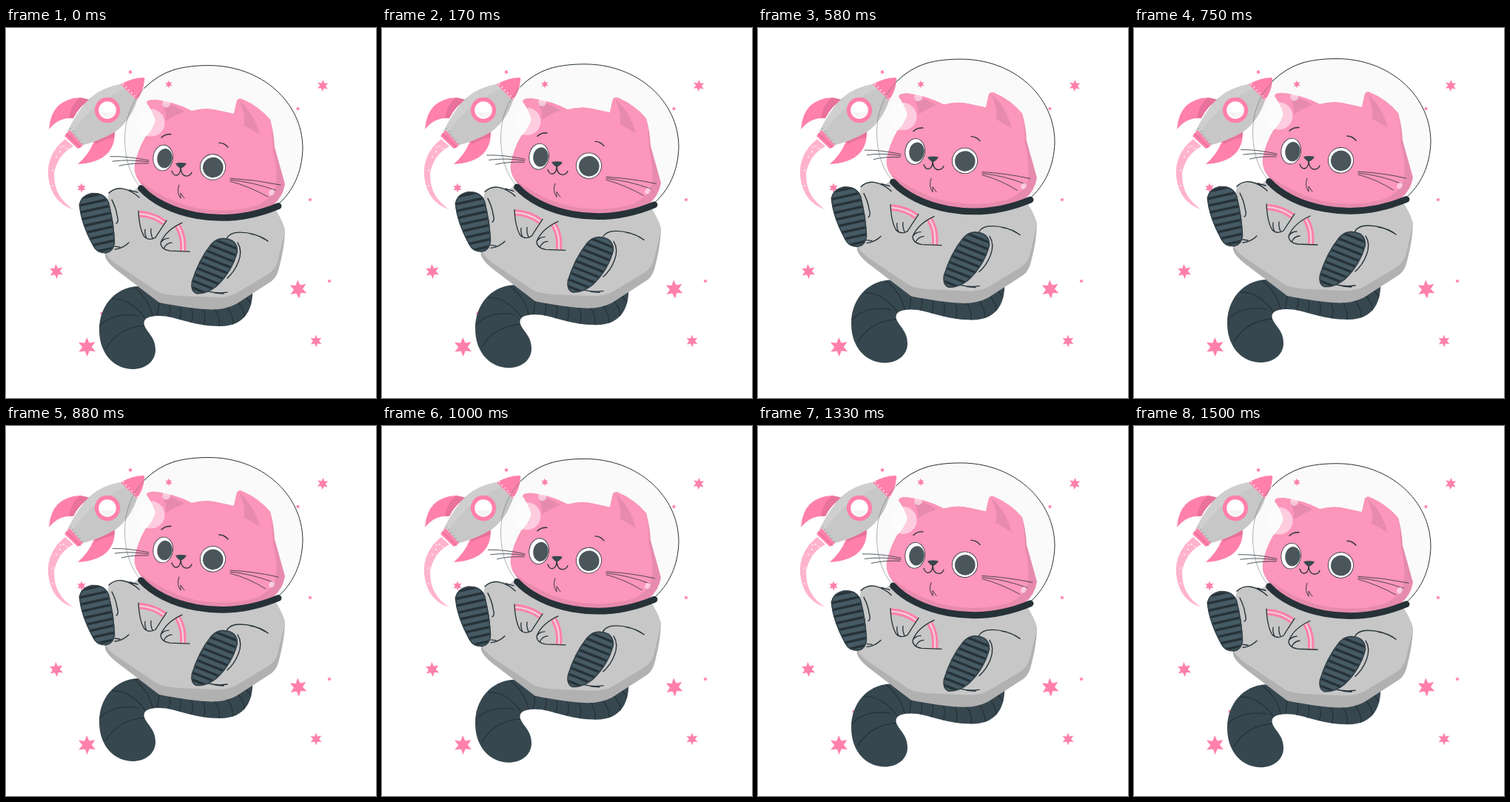
Animation of 500x500 px, one loop 1.54 s. Source, as an HTML page with a canvas:

```html
<!DOCTYPE html>
<html lang="en">
<head>
<meta charset="utf-8">
<title>Floating space cat</title>
<style>
html, body { margin: 0; width: 100%; height: 100%; overflow: hidden; background: #fff; }
canvas { display: block; width: 500px; height: 500px; }
</style>
</head>
<body>
<canvas id="stage"></canvas>
<script>
const LOOP = 1540;
const PINK = '#ff80ab', FUR = '#fc96ba', FUR_SHADE = '#e78bae';
const SUIT = '#c7c7c7', SUIT_SHADE = '#b1b1b1', INK = '#263238', SLATE = '#37474f', SOLE = '#455a64';

const canvas = document.getElementById('stage');
const ctx = canvas.getContext('2d');
const scale = window.devicePixelRatio || 1;
canvas.width = canvas.height = 500 * scale;

function fill(d, color) {
  ctx.fillStyle = color;
  ctx.fill(new Path2D(d));
}

function line(d, width = 1.2, color = INK) {
  ctx.strokeStyle = color;
  ctx.lineWidth = width;
  ctx.stroke(new Path2D(d));
}

function oval(x, y, rx, ry, color, turn = 0) {
  ctx.beginPath();
  ctx.ellipse(x, y, rx, ry, turn, 0, Math.PI * 2);
  ctx.fillStyle = color;
  ctx.fill();
}

function dot(x, y, r, color) {
  oval(x, y, r, r, color);
}

function clipped(d, draw) {
  ctx.save();
  ctx.clip(new Path2D(d));
  draw();
  ctx.restore();
}

function star(x, y, r, turn) {
  ctx.beginPath();
  for (let i = 0; i < 12; i++) {
    const a = turn + i * Math.PI / 6;
    const d = i % 2 ? r * 0.48 : r;
    ctx.lineTo(x + d * Math.cos(a), y + d * Math.sin(a));
  }
  ctx.fillStyle = PINK;
  ctx.fill();
}

const stars = [
  [428, 78, 8, .6], [394.5, 109, 3, .5], [168, 59.5, 3.2, .6], [220, 76, 5.2, .45],
  [102, 216, 6.5, .5], [411, 232, 3, .5], [68, 329, 10, .45], [395, 353, 12.5, .45],
  [437, 342, 3, .6], [419, 423, 8.5, .5], [109.5, 431, 13, .5], [129.5, 386, 3.2, .5]
];

function drawRocket() {
  fill('M80 150Q55 170 57 200Q61 236 91 245Q64 228 65 196Q70 171 91 160Z', '#ffb3cd');
  for (const [x, y] of [[73, 167], [78, 160], [82, 163], [68, 174], [74, 161], [63, 192], [63, 213]]) dot(x, y, .9, '#fff');

  fill('M58 137Q61 96 100 94L114 97Q99 105 91 122Q72 120 58 137Z', PINK);
  fill('M100 94L114 97Q99 105 91 122L85 122Q88 103 100 94Z', '#e8729c');
  fill('M97 184Q112 171 119 153L147 138Q149 181 97 184Z', PINK);
  fill('M119 153L147 138L146 148Q132 150 122 157Z', '#e8729c');

  const hull = 'M155 76Q120 82 102 108Q90 125 83 140L98 160Q126 153 148 140Q168 125 177 98Z';
  fill(hull, SUIT);
  clipped(hull, () => fill('M155 76Q120 82 102 108Q90 125 83 140L87 145Q112 104 160 82Z', '#cfcfcf'));
  fill('M155 76Q171 67 186 67Q188 68 187 71Q186 85 177 98Z', PINK);
  fill('M86 138L104 159L97 163L79 146Z', PINK);
  line('M82 143L100 161', 2, '#e8729c');

  for (let i = 0; i < 6; i++) {
    dot(158.5 + i * 3.8, 76 + i * 3.9, .9, '#fff');
    dot(87 + i * 3.2, 136 + i * 4, .8, '#8e8e8e');
  }

  dot(137, 111, 17.2, PINK);
  dot(137, 111, 11.8, '#fff');
  fill('M127 114Q137 128 147 114Z', '#f3f3f3');
}

function drawTail() {
  const tail = 'M333 350C335 378 324 403 290 403C250 403 230 389 207 389C190 389 185 394 187 402' +
    'C191 412 202 418 202 435C202 451 188 461 171 461C148 461 126 442 126 408C126 376 147 351 177 349L240 350Z';
  fill(tail, SLATE);
  clipped(tail, () => {
    line('M135 433Q151 405 187 402M127 402Q148 383 179 389M144 366Q168 365 188 392M173 350Q194 367 198 389' +
      'M207 370Q206 382 204 390M221 372Q223 383 219 392M235 374Q239 387 233 397M250 377Q255 390 249 400' +
      'M265 378Q272 391 267 402M281 378Q290 391 288 403M298 375Q308 390 307 402M312 369Q324 382 322 394M322 362Q331 370 333 377', 1.3);
  });
}

function drawSuit() {
  const top = 'M182 213L172 220Q167 217 158 217Q147 215 139 224L130 270';
  fill(top + 'L134 309Q136 316 148 326L207 371Q248 379 270 380Q294 382 311 373L359 342' +
    'Q367 336 370 320Q376 297 377 275Q376 263 358 236Z', SUIT_SHADE);
  fill(top + 'L134 303Q142 315 152 321L204 356Q214 361 236 362L286 364Q300 364 312 358L355 332' +
    'Q364 326 367 316L377 275Q376 263 358 236Z', SUIT);
}

function drawBoot(d, x, y, slope) {
  fill(d, SOLE);
  clipped(d, () => {
    for (let i = 0; i < 9; i++) {
      const cy = y + i * 9.6;
      line(`M${x - 50} ${cy - 50 * slope}L${x + 50} ${cy + 50 * slope}`, 3.4);
    }
    line(d, 3, SLATE);
  });
  line(d, .6);
}

function drawLimbs() {
  line('M139 223Q147 215 158 217Q171 220 180 229M167 219L178 222M143 232Q149 244 150 253Q153 262 149 264' +
    'M147 299Q158 298 166 290M147 295L154 296', 1.4);
  line('M298 285Q302 276 316 276Q335 276 351 286M330 278Q344 280 354 288M313 290Q320 301 314 316Q309 329 299 338' +
    'M274 356Q286 359 299 357M282 358L294 359', 1.4);

  drawBoot('M99 239Q101 226 116 223Q134 222 139 236Q146 263 147 289Q146 302 136 304Q123 305 118 295Q101 264 99 239Z', 123, 225, -.22);
  drawBoot('M293 284Q313 284 313 302Q306 329 285 349Q271 360 257 359Q249 356 251 343Q260 313 277 292Q284 284 293 284Z', 282, 286, .4);

  ctx.lineCap = 'butt';
  const cuffs = 'M180 251Q199 252 214 263M232 267Q241 282 239 301';
  line(cuffs, 8.5, PINK);
  line(cuffs, 2.2, '#ead6dd');
  ctx.lineCap = 'round';
  line('M179 247Q180 271 187 282Q193 288 202 283Q209 272 217 260M190 284Q187 278 188 272M198 284Q195 277 196 271' +
    'M238 263Q216 273 209 290Q209 299 221 301L248 302M209 290Q213 284 220 284M213 298Q217 290 224 290', 1.3);
}

function drawWhiskers(pull) {
  const left = 141 + pull, right = 371 - pull;
  line(`M${left} 173.5Q166 173 193 179M${left + 3} 180Q168 177 193 181M${left + 12} 186Q171 182 192 183`, .8);
  line(`M303 203Q338 205 ${right} 212M303 205Q333 208 ${right - 7} 219M303 207Q329 214 ${right - 17} 228`, .8);
}

function drawHead() {
  const head = 'M190 101Q191 96 203 97Q228 100 251 112Q270 107 285 111L308 116L312 98Q314 94 319 96Q342 106 357 124' +
    'Q362 141 363 161L377 211Q374 229 360 240Q320 254 270 254Q221 249 187 216Q172 201 174 185Q178 165 188 148Q198 139 202 125Q198 112 190 101Z';
  fill(head, FUR_SHADE);
  clipped(head, () => fill('M185 90H354Q360 137 361 166Q368 195 364 216Q359 230 341 239Q315 248 280 246Q229 244 178 205L165 180Z', FUR));
  fill('M210 101Q228 103 241 113Q227 118 216 126Q217 112 210 101Z', FUR_SHADE);
  fill('M315 98Q335 114 343 144L321 131Q325 118 315 98Z', FUR_SHADE);

  for (const [x, y, rx, ry, px, prx, pry] of [[212.2, 175.4, 13.2, 17.3, 214.5, 10.2, 13.2], [279.5, 187.8, 17, 17.2, 279.8, 13.8, 13.8]]) {
    oval(x, y, rx + .5, ry + .5, INK, .12);
    oval(x, y, rx - .3, ry - .3, '#fff', .12);
    oval(px, y + .6, prx, pry, '#4b565b', .12);
  }

  line('M210 148Q215 143 223 143.5M288 155Q295 155 300 161', 1.4);
  fill('M229 183Q236 181 244 183Q241 188 236 190Q231 187 229 183Z', SLATE);
  line('M224 193Q226 199 230 199Q236 198 236 189Q237 200 244 200Q249 200 251 195', 1.3);
  line('M234 212Q230 222 236 230L236 223L241 230', .9);
}

function drawHelmet(lift) {
  const left = 'M181 214C164 195 159 165 161 140C164 100 191 67 228 56';
  const rightCurve = 'C242 52 258 50.5 274 50.5C345 50.5 401 100 401 163C400 195 388 221 366 240';
  fill(left + rightCurve + 'Z', 'rgba(0,0,0,.02)');
  drawHead();
  drawWhiskers(lift * .4);
  line(left, .5, '#5d666a');
  line('M187 81Q205 63 228 56', .9);
  line('M228 56' + rightCurve, 1);
  dot(196, 128, 18.5, 'rgba(255,255,255,.52)');
  dot(216.5, 102, 5.5, 'rgba(255,255,255,.52)');
  oval(359, 222, 3.5, 4.5, 'rgba(255,255,255,.52)', .5);
  line('M182.5 216.5C213 250 290 273 368 240.5', 8.8);
}

function frame(now) {
  const t = now % LOOP;
  const lift = 4.4 + 4.65 * Math.cos((t - 710) / LOOP * Math.PI * 2);
  ctx.setTransform(scale, 0, 0, scale, 0, 0);
  ctx.lineCap = ctx.lineJoin = 'round';
  ctx.fillStyle = '#fff';
  ctx.fillRect(0, 0, 500, 500);
  stars.forEach(s => star(...s));
  drawRocket();
  ctx.translate(0, -lift);
  drawTail();
  drawSuit();
  drawLimbs();
  drawHelmet(lift);
  requestAnimationFrame(frame);
}

requestAnimationFrame(frame);
</script>
</body>
</html>
```
